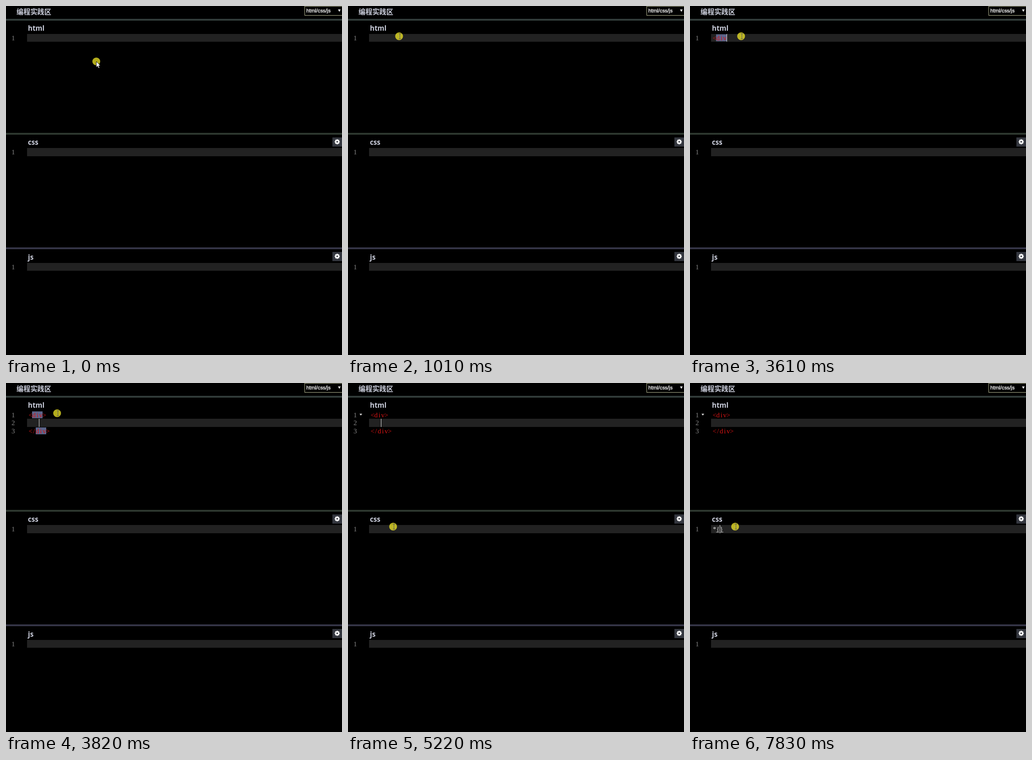
Write an HTML page with a canvas that moves like this. It is 735 px wide and 762 px high and loops after 8000 ms.

```html
<!DOCTYPE html>
<html lang="zh">
<head>
<meta charset="utf-8">
<style>
  html, body { margin: 0; width: 100%; height: 100%; overflow: hidden; background: #000; }
  canvas { display: block; }
</style>
</head>
<body>
<canvas id="stage" width="735" height="762"></canvas>
<script>
const ctx = document.getElementById('stage').getContext('2d');
const LOOP = 8000, CELL = 7.5, LINE = 17.6, CODE_X = 50;
const HTML = 60.6, CSS = 310.4, JS = 560.6;
const RED = '#d81414', PALE = '#dedede';

// Each step lists its start time and only what changes from then on.
const POINTER = [
  [0, { x: 197.5, y: 121, shape: 'arrow' }],
  [200, { x: 171.5, y: 100.5, shape: 'arrow' }],
  [400, { x: 111.8, y: 66, shape: 'beam' }],
  [4820, { x: 115, y: 354, shape: 'arrow' }],
  [5030, { x: 115, y: 334.5, shape: 'arrow' }],
  [5220, { x: 98.7, y: 313.5, shape: 'beam' }]
];
const MARKUP = [
  [0, ['']], [1990, ['<']], [2200, ['<d']], [2410, ['<di']], [2600, ['<div']],
  [3820, ['<div>', '', '</div>']]
];
const STYLE = [[0, ''], [7240, '*'], [7830, '*{}']];
// Caret: [pane, line, column], or null while hidden.
const CARET = [
  [0, null], [590, [HTML, 0, 0]], [1010, null], [1600, [HTML, 0, 0]],
  [1990, [HTML, 0, 1]], [2200, [HTML, 0, 2]], [2410, [HTML, 0, 3]], [2600, [HTML, 0, 4]],
  [3030, null], [3610, [HTML, 0, 4]], [3820, [HTML, 1, 3]],
  [4420, null], [4820, [HTML, 1, 3]], [5410, [CSS, 0, 0]],
  [5840, null], [6430, [CSS, 0, 0]], [7040, null],
  [7240, [CSS, 0, 1]], [7830, [CSS, 0, 2]]
];

const at = (steps, t) => steps.filter(([start]) => start <= t).pop()[1];
const lineTop = (pane, line) => Math.round(pane + line * LINE);
const columnX = col => Math.floor(CODE_X + col * CELL);

function rect(x, y, w, h, color) {
  ctx.fillStyle = color;
  ctx.fillRect(x, y, w, h);
}

function polygon(color, ...points) {
  ctx.fillStyle = color;
  ctx.beginPath();
  points.forEach(([x, y]) => ctx.lineTo(x, y));
  ctx.closePath();
  ctx.fill();
}

function disc(x, y, r, color) {
  ctx.fillStyle = color;
  ctx.beginPath();
  ctx.arc(x, y, r, 0, 2 * Math.PI);
  ctx.fill();
}

function label(text, x, y, font, color) {
  ctx.font = font;
  ctx.fillStyle = color;
  ctx.textAlign = 'left';
  ctx.fillText(text, x, y);
}

function code(text, x, top, color) {
  ctx.font = '15px "Liberation Serif", serif';
  ctx.fillStyle = color;
  ctx.textAlign = 'center';
  [...text].forEach((char, i) => ctx.fillText(char, x + (i + 0.5) * CELL, top + 14));
}

function gear(x, y) {
  rect(x - 10.5, y - 9.5, 21, 20, '#34373f');
  ctx.save();
  ctx.translate(x, y);
  for (let i = 0; i < 8; i++) {
    rect(-1.3, -5.6, 2.6, 3, '#fff');
    ctx.rotate(Math.PI / 4);
  }
  ctx.restore();
  disc(x, y, 4.3, '#fff');
  disc(x, y, 1.8, '#34373f');
}

function pane(name, top, lineCount, activeLine) {
  label(name, 48, Math.round(top) - 7, 'bold 15.2px "Open Sans", sans-serif', '#cbcedc');
  const y = lineTop(top, activeLine);
  rect(46, y, 689, lineTop(top, activeLine + 1) - y, '#222');
  for (let i = 0; i < lineCount; i++) code(String(i + 1), 12, lineTop(top, i), '#858585');
}

function header() {
  label('编程实践区', 23, 18, 'bold 15.2px "Noto Sans CJK SC", "Noto Sans CJK", sans-serif', '#cbcedc');
  ctx.lineWidth = 1;
  ctx.strokeStyle = '#b5b792';
  ctx.strokeRect(653.5, 0.5, 90, 20);
  label('html/css/js', 657, 14, '11.4px "Liberation Sans", Arial, sans-serif', '#fff');
  ctx.lineWidth = 0.35;
  ctx.strokeStyle = '#fff';
  ctx.strokeText('html/css/js', 657, 14);
  polygon('#fff', [726.3, 7.5], [732, 7.5], [729.2, 12.8]);
}

function pointer({ x, y, shape }) {
  disc(x, y, 8.6, 'rgba(255, 245, 40, 0.7)');
  if (shape === 'beam') {
    const bx = Math.floor(x + 1.5);
    rect(bx, y - 6, 1, 12, '#5d5d58');
    rect(bx - 2, y - 6, 5, 1, '#5d5d58');
    rect(bx - 2, y + 5, 5, 1, '#5d5d58');
    return;
  }
  polygon('#fff', ...[[0, 0], [0, 13], [3, 10.3], [5, 15], [7.2, 14], [5.2, 9.6], [9.3, 9.6]]
    .map(([dx, dy]) => [x + dx, y + dy]));
  ctx.lineWidth = 0.9;
  ctx.strokeStyle = '#000';
  ctx.stroke();
}

function draw(t) {
  const markup = at(MARKUP, t), style = at(STYLE, t);
  rect(0, 0, 735, 762, '#000');
  header();
  rect(0, 28, 735, 4, '#313b39');
  rect(0, 277, 735, 4, '#2e382f');
  rect(0, 527, 735, 4, '#343446');
  pane('html', HTML, markup.length, markup.length > 1 ? 1 : 0);
  pane('css', CSS, 1, 0);
  pane('js', JS, 1, 0);
  gear(724.5, 296.5);
  gear(724.5, 546.5);

  const matching = t >= 2600 && t < 4030;
  markup.forEach((text, i) => {
    const top = lineTop(HTML, i), start = text.indexOf('div');
    if (matching && start >= 0) rect(columnX(start), top + 1, 23, 15, '#5b648a');
    code(text, CODE_X, top, RED);
  });
  if (t >= 4220) polygon('#d5d5d5', [25.2, 67], [31, 67], [28.1, 71.2]);

  code(style, CODE_X, lineTop(CSS, 0), PALE);
  if (style.includes('{')) {
    rect(57, 325, 4, 1, '#bbb');
    rect(69, 325, 4, 1, '#bbb');
  }

  const caret = at(CARET, t);
  if (caret) {
    const [top, line, col] = caret, y = lineTop(top, line);
    rect(columnX(col), y, 1, lineTop(top, line + 1) - y, '#ddd');
  }
  pointer(at(POINTER, t));
}

const origin = performance.now();
function tick() {
  draw((performance.now() - origin) % LOOP);
  requestAnimationFrame(tick);
}
tick();
</script>
</body>
</html>
```
